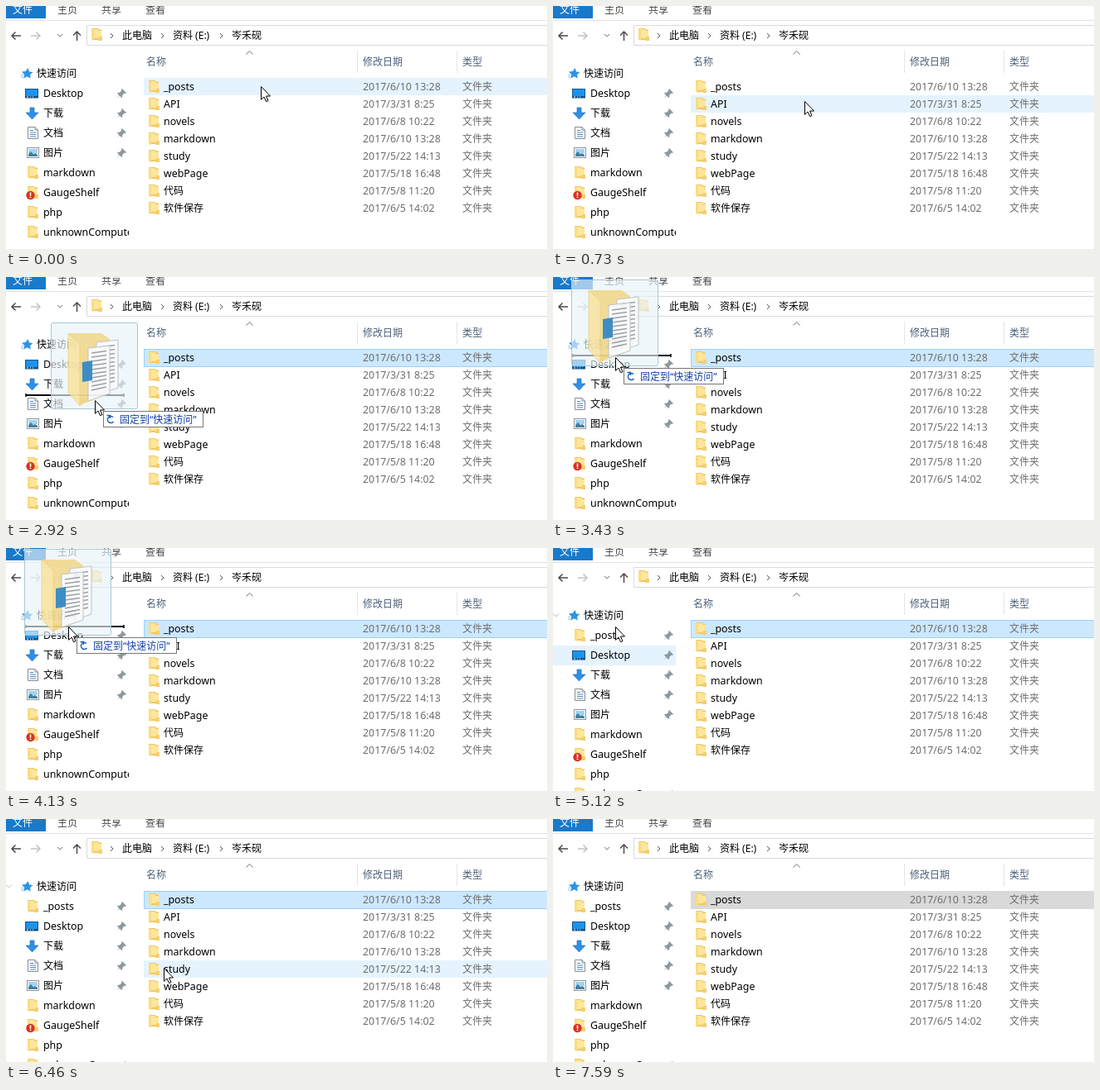
Animation of 652 by 294 pixels, one loop 7710 ms. Source, as an HTML page:

```html
<!DOCTYPE html>
<html lang="zh-CN">
<head>
<meta charset="utf-8">
<title>固定到快速访问</title>
<style>
html, body { margin: 0; width: 100%; height: 100%; overflow: hidden; background: #fff; }
svg { display: block; width: 652px; height: 294px; }
text { font-family: "Noto Sans", "Noto Sans CJK SC", "Noto Sans CJK", sans-serif; font-size: 12.4px; fill: #000; white-space: pre; }
text.han { font-size: 12px; }
.line { fill: none; stroke-width: 1; }
</style>
</head>
<body>
<svg viewBox="0 0 652 294">
  <defs>
    <g id="folder">
      <path d="M0 0H8L9 1.5H12V14H0Z" fill="#eec765"/>
      <path d="M1 1H7.5L8.5 3H12V12H1Z" fill="#ffe69b"/>
      <path d="M0 0L3 2V15L0 14Z" fill="#fbdb82"/>
      <path d="M9 10H13V15H8Z" fill="#f4cf70"/>
    </g>
    <g id="badge">
      <use href="#folder"/>
      <circle cx="3.5" cy="11" r="5.2" fill="#d8321c"/>
      <path d="M3.5 7.5V11.7M3.5 12.8V14.3" stroke="#fff" stroke-width="1.6"/>
    </g>
    <g id="desktop">
      <rect x="-2.5" y="2.5" width="15" height="10.5" fill="#1c93ea" stroke="#14568c"/>
      <path d="M-2 12H12" stroke="#0b4f86" stroke-width="2"/>
      <path d="M-1 12H1M3 12H4M6 12H7" stroke="#fff"/>
    </g>
    <path id="download" d="M3 1H8V7H13L5.5 15L-2 7H3Z" fill="#2f8fe3" stroke="#2273c4" stroke-width=".7"/>
    <g id="document">
      <path d="M.5 .5H9L12.5 4V14.5H.5Z" fill="#fff" stroke="#858b91"/>
      <path d="M9 .5V4H12.5" fill="none" stroke="#858b91"/>
      <path d="M3 4.5H7M3 7H10M3 9.5H10M3 12H10" stroke="#4b87bd"/>
    </g>
    <g id="picture">
      <rect x="-.5" y="1.5" width="14" height="12" fill="#fff" stroke="#8d949b"/>
      <path d="M1 3H12V8H1Z" fill="#9fd4f5"/>
      <path d="M1 12V9L4 6L7 9L9 8L12 10V12Z" fill="#447f9e"/>
    </g>
    <path id="pin" d="M6 0L11 5L9.7 6L8.7 5.6L6.2 8.1V10.2L5 11L3 8.6L0 11L2.3 8L0 5.8L1 4.8H3L5.4 2.3L5 1Z" fill="#8d979e"/>
    <path id="sep" class="line" d="M0 0L3 3L0 6" stroke="#555"/>
    <path id="arrow" class="line" d="M12 0H1M5.5 -4.5L1 0L5.5 4.5" style="stroke-width:1.5"/>
    <path id="pointer" d="M.5 .5V16.3L4 13L6.6 18.7L9 17.6L6.5 12H11.5Z" fill="#fff" stroke="#000"/>
    <g id="sheet">
      <path d="M0 3L26 0V58L0 67Z" fill="#fafafa" stroke="#b5b9bb"/>
      <path id="lines" d="M4 9L22 6.5M4 14L22 11.5M4 19L22 16.5M4 24L22 21.5M4 29L22 26.5M4 34L22 31.5M4 39L22 36M4 44L22 40.5M4 49L22 45.5M4 54L22 50" stroke="#8b9093" stroke-width="1.5"/>
    </g>
    <clipPath id="pane"><rect y="50" width="148" height="244"/></clipPath>
  </defs>

  <g id="chrome">
    <rect width="48" height="15" fill="#1979ca"/>
    <path class="line" d="M0 17.5H652" stroke="#e2e3e4"/>
    <path class="line" d="M652 23.5H97.5V47.5H652" stroke="#d9d9d9"/>
    <use href="#arrow" x="6" y="36" stroke="#4a4a4a"/>
    <use href="#arrow" transform="translate(42 36) scale(-1 1)" stroke="#c4c4c4"/>
    <path class="line" d="M62 34L65 37L68 34" stroke="#777"/>
    <use href="#arrow" transform="translate(85.5 30) rotate(90)" stroke="#4a4a4a"/>
    <use href="#folder" x="103" y="27"/>
    <use href="#sep" x="126" y="33"/><use href="#sep" x="187" y="33"/><use href="#sep" x="258" y="33"/>
    <path class="line" d="M289.5 58.5L293.5 54.5L297.5 58.5" stroke="#777"/>
    <path class="line" d="M423.5 54V81M543.5 54V81" stroke="#e5e5e5"/>
  </g>

  <rect id="hover" fill="#e5f3ff"/>
  <rect id="selected" x="166.5" y="87.5" width="488" height="21"/>
  <g id="files"></g>

  <g clip-path="url(#pane)">
    <path id="chevron" class="line" d="M0 79.5L3.5 83L7 79.5" stroke="#b0b0b0"/>
    <path d="M26.5 75L28 79.4L32.5 80L29 83L29.8 87.5L25.5 85.3L21 87.5L22.3 83L19 79.5L23.6 79Z" fill="#2c93e6"/>
    <path d="M18.5 83.5H21M18 86H20.5" stroke="#7dbdf1"/>
    <g id="pinned"></g>
    <g id="places"></g>
  </g>

  <g id="drag">
    <g id="marker"><path d="M24 0H142" stroke="#000" stroke-width="2"/><path d="M24 -2V2M142 -2V2" stroke="#000" stroke-width="1.5"/></g>
    <g id="ghost">
      <rect x="-52.5" y="-93.5" width="104" height="104" rx="2" fill="#e8f3f9" fill-opacity=".66" stroke="#a9c7d3"/>
      <g opacity=".82">
        <path d="M-32 -81H8L18 -74V-8L-18 6Z" fill="#f2d683"/>
        <use href="#sheet" x="2" y="-73"/>
        <use href="#sheet" x="-8" y="-66"/>
        <path d="M-15 -46L-3 -48V-24L-15 -22Z" fill="#1776b8"/>
        <path d="M-32 -81L-18 -68V7L-32 -9Z" fill="#fae29a" stroke="#e6c567" stroke-width=".7"/>
        <path d="M-18 -4L-8 -1L-18 7Z" fill="#f0cf72"/>
      </g>
      <rect x="10.5" y="13.5" width="120" height="19" fill="#fff" stroke="#777"/>
      <path class="line" d="M22 20.5A4 4 0 1 0 22.5 26M14.5 18.5H18.5V22" stroke="#1f5fc0" style="stroke-width:1.4"/>
    </g>
  </g>
  <use id="cursor" href="#pointer"/>
</svg>

<script>
const LOOP = 7710, SELECT = 1160, DRAG = 2230, DROP = 5120, BLUR = 7590;
const ROW = 21, LIST_TOP = 87, ITEM = 24, PANE_TOP = 94;
const $ = id => document.getElementById(id);
const NS = 'http://www.w3.org/2000/svg';

function add(parent, tag, attrs) {
  const el = document.createElementNS(NS, tag);
  for (const key in attrs) el.setAttribute(key, attrs[key]);
  return parent.appendChild(el);
}
function set(el, attrs) {
  for (const key in attrs) el.setAttribute(key, attrs[key]);
}
function label(parent, x, y, string, fill = '#000') {
  const han = /[\u4e00-\u9fff]/.test(string);
  const el = add(parent, 'text', { x, y, class: han ? 'han' : '' });
  el.style.fill = fill;
  el.textContent = string;
}
function icon(parent, name, x, y) {
  add(parent, 'use', { href: '#' + name, x, y });
}

// Ribbon, address bar and column headings
[['文件', 8, '#fff'], ['主页', 62, '#444'], ['共享', 115, '#444'], ['查看', 168, '#444']]
  .forEach(([name, x, color]) => label($('chrome'), x, 9, name, color));
[['此电脑', 140], ['资料 (E:)', 201], ['岑禾砚', 272]]
  .forEach(([name, x]) => label($('chrome'), x, 40, name));
[['名称', 169], ['修改日期', 430], ['类型', 550]]
  .forEach(([name, x]) => label($('chrome'), x, 72, name, '#4c607a'));

[['_posts', '6/10 13:28'], ['API', '3/31 8:25'], ['novels', '6/8 10:22'],
 ['markdown', '6/10 13:28'], ['study', '5/22 14:13'], ['webPage', '5/18 16:48'],
 ['代码', '5/8 11:20'], ['软件保存', '6/5 14:02']].forEach(([name, date], i) => {
  const y = LIST_TOP + i * ROW;
  icon($('files'), 'folder', 172, y + 3);
  label($('files'), 190, y + 15, name);
  label($('files'), 430, y + 15, '2017/' + date, '#6d6d6d');
  label($('files'), 550, y + 15, '文件夹', '#6d6d6d');
});

function place(parent, name, image, index, pinned) {
  const y = PANE_TOP + index * ITEM;
  icon(parent, image, 26, y + 4);
  label(parent, 45, y + 16, name);
  if (pinned) icon(parent, 'pin', 134, y + 6);
}
label($('places').parentNode, 37, 86, '快速访问');
place($('pinned'), '_posts', 'folder', 0, true);
[['Desktop', 'desktop'], ['下载', 'download'], ['文档', 'document'], ['图片', 'picture'],
 ['markdown', 'folder'], ['GaugeShelf', 'badge'], ['php', 'folder'], ['unknownComputer', 'folder']]
  .forEach(([name, image], i) => place($('places'), name, image, i, i < 4));
label($('ghost'), 30, 27.5, '固定到“快速访问”', '#1440a8');

// Pointer stops, evenly spaced in time within each run
const stops = [];
function run(from, to, points) {
  points.forEach(([x, y], i) => {
    const time = from + (to - from) * i / Math.max(1, points.length - 1);
    stops.push({ time: Math.floor(time), x, y });
  });
}
run(0, 0, [[307, 97]]);
run(150, 880, [[306, 105], [304, 116], [303, 126], [303, 115], [304, 105], [304, 99]]);
run(1160, 2110, [[304, 99], [298, 98], [276, 96], [246, 92], [216, 87], [190, 82], [163, 56], [141, 76]]);
run(2230, 3190, [[134, 99], [129, 126], [122, 152], [115, 169], [110, 160], [107, 149], [80, 152], [54, 158]]);
run(3310, 3430, [[66, 125], [75, 97]]);
run(3580, 3710, [[76, 94], [75, 96]]);
run(4010, 4130, [[75, 94], [75, 95]]);
run(5120, 5120, [[75, 95]]);
run(5250, 6070, [[82, 98], [102, 106], [132, 119], [162, 136], [181, 151], [189, 161]]);
run(6220, 6460, [[190, 166], [190, 173], [190, 180]]);
run(6610, 7160, [[202, 195], [285, 203], [410, 196], [545, 182], [700, 165]]);
run(7310, 7310, [[700, 165]]);

const show = (id, on) => { $(id).style.display = on ? '' : 'none'; };

function hoverBox({ time, x, y }) {
  if (time >= SELECT && time < DROP || x > 652) return null;
  if (x >= 166) {
    return { x: 166, y: LIST_TOP + Math.floor((y - LIST_TOP) / ROW) * ROW, width: 486, height: ROW };
  }
  if (x > 148) return null;
  // The old item keeps its highlight as the list shifts under the pointer
  const index = time === DROP ? 1 : Math.floor((y - PANE_TOP) / ITEM);
  return { x: 0, y: PANE_TOP + index * ITEM, width: 148, height: ITEM };
}

function draw(t) {
  const stop = stops.findLast(s => s.time <= t);
  const { time, x, y } = stop;
  const dragging = t >= DRAG && t < DROP, dropped = t >= DROP;

  const box = hoverBox(stop);
  show('hover', box);
  if (box) set($('hover'), box);

  show('selected', t >= SELECT);
  set($('selected'), t < BLUR
    ? { fill: '#cce8ff', stroke: '#99d1ff' }
    : { fill: '#d9d9d9', stroke: '#d9d9d9' });

  show('pinned', dropped);
  set($('places'), { transform: `translate(0 ${dropped ? ITEM : 0})` });
  const fade = Math.min(1, Math.max(0, (7310 - time) / 1090));
  set($('chevron'), { opacity: dropped ? fade : 0 });

  show('drag', dragging);
  const gap = Math.round((y - PANE_TOP) / ITEM);
  set($('marker'), { transform: `translate(0 ${PANE_TOP + 1 + gap * ITEM})` });
  set($('ghost'), { transform: `translate(${x} ${y})` });
  set($('cursor'), { x, y });
}

const start = performance.now();
function tick() {
  draw((performance.now() - start) % LOOP);
  requestAnimationFrame(tick);
}
tick();
</script>
</body>
</html>
```
